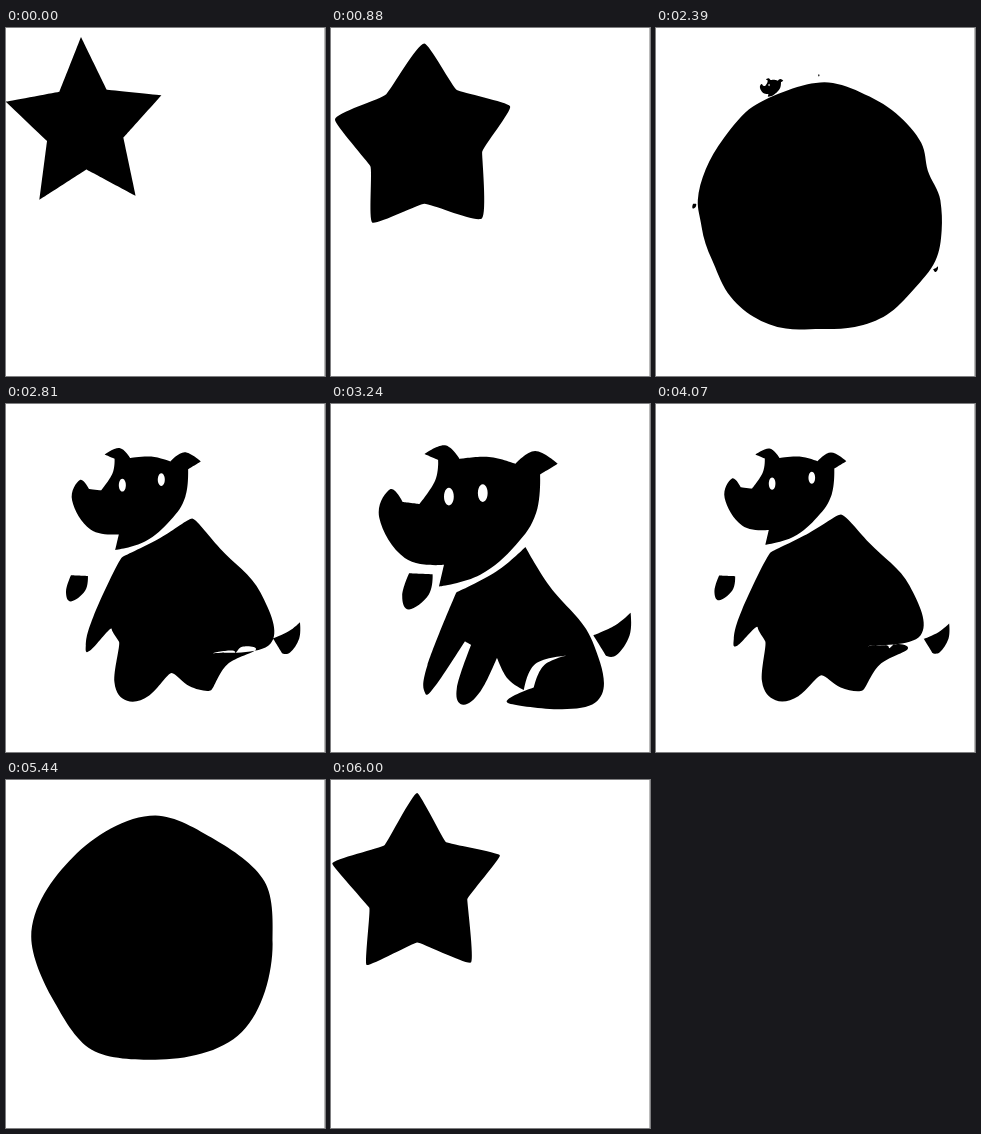
An HTML page for the animation above (6070 ms loop, 319 px wide and 348 px high).

```html
<!DOCTYPE html>
<html lang="en">
<head>
<meta charset="utf-8">
<title>Shape morph</title>
<style>
  html, body { margin: 0; width: 100%; height: 100%; overflow: hidden; background: #fff; }
  svg { display: block; width: 319px; height: 348px; }
</style>
</head>
<body>
<svg viewBox="0 0 319 348">
  <path id="shape" fill-rule="evenodd"/>
  <path d="M318.5 0V348" stroke="#bbb"/>
</svg>
<script>
const LOOP = 6070, MOVE = 1070;
const CX = 164.5, CY = 174.5, R = 133.5;
const rad = deg => deg * Math.PI / 180;
const mix = (a, b, k) => a + (b - a) * k;
const times = (n, fn) => Array.from({ length: n }, (_, i) => fn(i));

// Points at clockwise angles from the top
const polar = (x, y, rx, ry, deg) => [x + rx * Math.sin(rad(deg)), y - ry * Math.cos(rad(deg))];
const rim = deg => polar(CX, CY, R, R, deg);

// Flat cubic run along the circle through the given angles
function arcs(angles) {
  const out = rim(angles[0]);
  for (let i = 1; i < angles.length; i++) {
    const a = rad(angles[i - 1]), b = rad(angles[i]);
    const k = R * 4 / 3 * Math.tan((b - a) / 4);
    const [x0, y0] = rim(angles[i - 1]), [x1, y1] = rim(angles[i]);
    out.push(x0 + k * Math.cos(a), y0 + k * Math.sin(a),
             x1 - k * Math.cos(b), y1 - k * Math.sin(b), x1, y1);
  }
  return out;
}

// Closed cubic run through key points; a third value of 1 makes a corner
function outline(keys) {
  const n = keys.length, at = i => keys[(i + n) % n];
  const handle = (i, dir) => [0, 1].map(c =>
    at(i)[c] + (at(i)[2] ? 0 : dir * (at(i + 1)[c] - at(i - 1)[c]) / 5));
  const out = at(0).slice(0, 2);
  for (let i = 0; i < n; i++) {
    out.push(...handle(i, 1), ...handle(i + 1, -1), ...at(i + 1).slice(0, 2));
  }
  return out;
}

// A ring opens into the whole circle, a bud shrinks to one spot on its rim
const ring = (keys, angles) => ({ pts: outline(keys), round: arcs(angles) });
const bud = (keys, deg) => {
  const pts = outline(keys);
  return { pts, round: pts.map((_, i) => rim(deg)[i % 2]) };
};

// Star tips alternate with inner points; circle quadrants split in 3, 2, 3, 2
const TOP = [75, 9];
const starKeys = times(10, i => {
  const r = i % 2 ? 0.49 : 1;
  return [...polar(75, 98, 82 * r, 89 * r, 36 * i), 1];
});
const starAngles = [0, 1, 2, 3].flatMap(q => {
  const n = q % 2 ? 2 : 3;
  return times(n, i => 90 * (q + i / n));
}).concat(360);
const star = [ring(starKeys, starAngles)];

const body = [
  [195, 145, 1], [219, 185], [262, 241], [264, 303],                    // back
  [176, 303], [201, 286, 1], [211, 263], [235, 252, 1],                 // hind leg
  [203, 260], [192, 286, 1], [176, 274], [166, 253, 1],                 // belly
  [150, 287], [133, 301], [127, 285], [142, 241, 1],                    // front legs
  [136, 238, 1], [106, 284], [95, 292], [97, 265], [126, 191, 1], [166, 170]
];
const head = [
  [93, 50, 1], [114, 41], [129, 55, 1], [159, 53], [186, 60, 1],
  [206, 47], [229, 60, 1], [211, 71, 1], [207, 110], [186, 143],
  [150, 173], [108, 185, 1], [113, 163, 1], [73, 156], [47, 115],
  [58, 86], [71, 99, 1], [88, 101, 1], [104, 77], [107, 56, 1]
];
const tail = [[300, 208, 1], [299, 231], [286, 251], [275, 252, 1], [262, 231, 1], [284, 221]];
const tongue = [[79, 169, 1], [103, 170, 1], [99, 191], [79, 206], [72, 192]];
const eye = (x, y) => times(6, i => polar(x, y, 5, 9, 60 * i));

const dog = [
  ring(body, times(body.length + 1, i => 360 * i / body.length)),
  bud(head, 337),
  bud(eye(118, 93.5), 337),
  bud(eye(151.5, 90), 0),
  bud(tail, 120.7),
  bud(tongue, 269)
];

const draw = (parts, k) => parts.map(({ pts, round }) => {
  const p = pts.map((v, i) => mix(round[i], v, k).toFixed(2));
  return `M${p.slice(0, 2)}C${p.slice(2)}Z`;
}).join("");

const span = (t, start) => Math.min(1, Math.max(0, (t - start) / MOVE));
const easeOut = u => 1 - (1 - u) ** 2;
const easeIn = u => u * u;

function pose(t) {
  if (t < 2100) return draw(star, 1 - easeOut(span(t, 765)));
  if (t < 3420) return draw(dog, easeOut(span(t, 2320)));
  if (t < 4800) return draw(dog, 1 - easeIn(span(t, 3455)));
  return draw(star, easeIn(span(t, 5000)));
}

// The star swings from its top tip as it lands
function swing(t) {
  const u = (t + 60) % LOOP / 390;
  return u < 1 ? -5 * Math.sin(Math.PI * u) : 0;
}

const shape = document.getElementById("shape");
const start = performance.now();
function tick() {
  const t = (performance.now() - start) % LOOP;
  shape.setAttribute("d", pose(t));
  shape.setAttribute("transform", `rotate(${swing(t)} ${TOP})`);
  requestAnimationFrame(tick);
}
tick();
</script>
</body>
</html>
```
